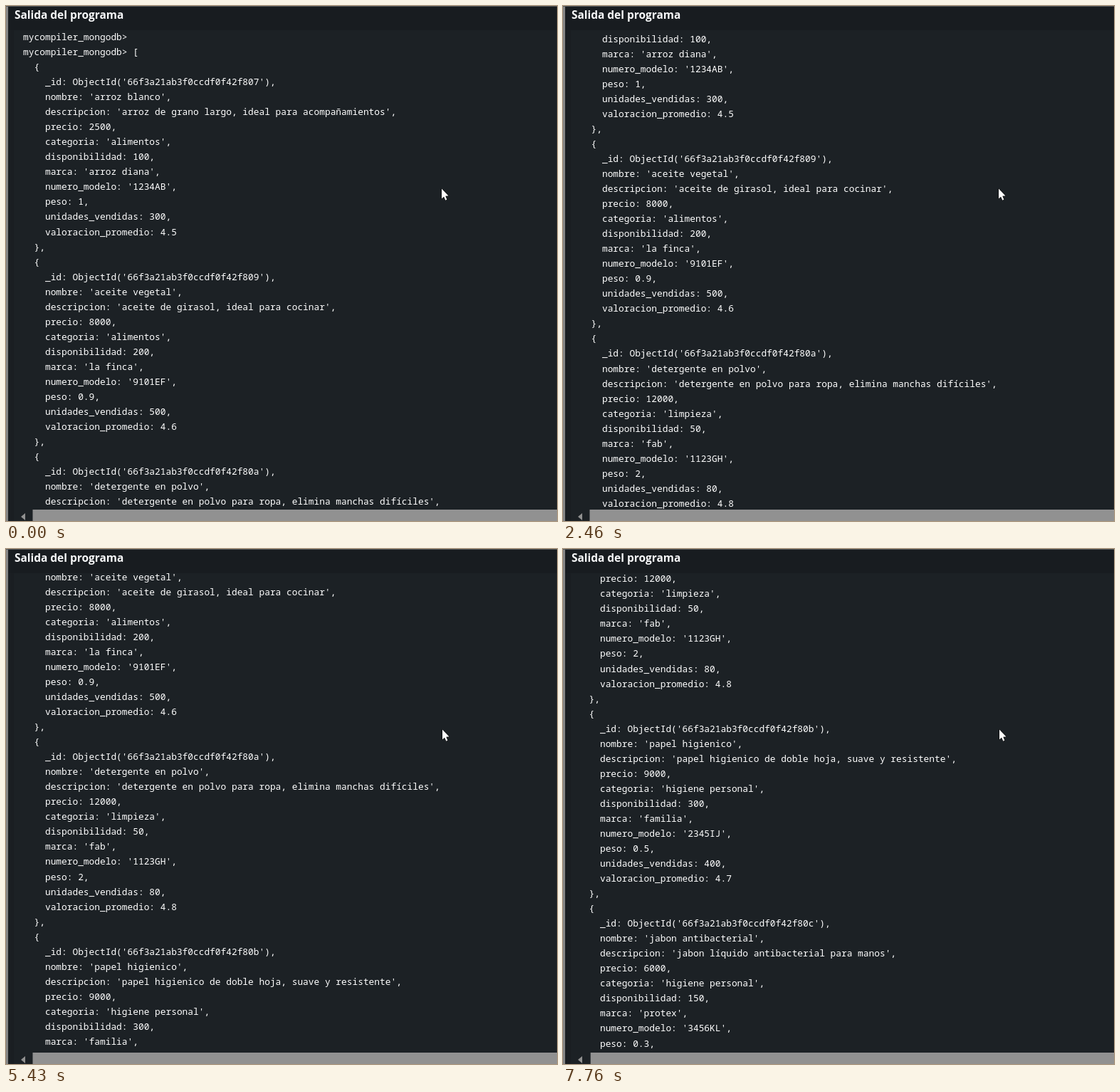
Animation, 774 px wide and 723 px high, one loop 8 s. Source, as an HTML page with a canvas:

```html
<!DOCTYPE html>
<html lang="es">
<head>
<meta charset="utf-8">
<title>Salida del programa</title>
<style>
  html, body { margin: 0; width: 100%; height: 100%; overflow: hidden; background: #1c2125; }
  canvas { display: block; }
</style>
</head>
<body>
<canvas id="stage" width="774" height="723"></canvas>
<script>
const ctx = document.getElementById('stage').getContext('2d');
const LOOP = 8000, LINE = 21.04;

const keys = ['nombre', 'descripcion', 'precio', 'categoria', 'disponibilidad', 'marca',
  'numero_modelo', 'peso', 'unidades_vendidas', 'valoracion_promedio'];

const products = [
  ['807', 'arroz blanco', 'arroz de grano largo, ideal para acompañamientos', 2500, 'alimentos', 100, 'arroz diana', '1234AB', 1, 300, 4.5],
  ['809', 'aceite vegetal', 'aceite de girasol, ideal para cocinar', 8000, 'alimentos', 200, 'la finca', '9101EF', 0.9, 500, 4.6],
  ['80a', 'detergente en polvo', 'detergente en polvo para ropa, elimina manchas difíciles', 12000, 'limpieza', 50, 'fab', '1123GH', 2, 80, 4.8],
  ['80b', 'papel higienico', 'papel higienico de doble hoja, suave y resistente', 9000, 'higiene personal', 300, 'familia', '2345IJ', 0.5, 400, 4.7],
  ['80c', 'jabon antibacterial', 'jabon líquido antibacterial para manos', 6000, 'higiene personal', 150, 'protex', '3456KL', 0.3]
];

const quote = v => typeof v === 'string' ? `'${v}'` : v;

function record([id, ...values]) {
  const fields = values.map((v, i) =>
    `    ${keys[i]}: ${quote(v)}${i < keys.length - 1 ? ',' : ''}`);
  return ['  {', `    _id: ObjectId('66f3a21ab3f0ccdf0f42f${id}'),`, ...fields, '  },'];
}

const lines = ['mycompiler_mongodb>', 'mycompiler_mongodb> [', ...products.flatMap(record)];

const easeOut = power => p => 1 - (1 - p) ** power;
const easeInOut = p => p * p * (3 - 2 * p);

// Each swipe scrolls a distance in a number of discrete steps
const swipes = [
  { start: 670, step: 135, count: 7, distance: 95.3, ease: easeOut(2.3) },
  { start: 2170, step: 143, count: 7, distance: 97.2, ease: easeOut(2.3) },
  { start: 4130, step: 131, count: 12, distance: 183, ease: easeInOut },
  { start: 6220, step: 128, count: 13, distance: 299.5, ease: easeOut(1.54) }
];

function progress({ start, step, count }, t) {
  const done = Math.floor((t - start) / step) + 1;
  return Math.min(Math.max(done / count, 0), 1);
}

const scrollAt = t => swipes.reduce((sum, s) => sum + s.distance * s.ease(progress(s, t)), 0);

// The last swipe drifts right, then left
function shiftAt(t) {
  const p = progress(swipes[3], t);
  return Math.round(p * (12.2 - 15.2 * p));
}

function fill(color, x, y, w, h) {
  ctx.fillStyle = color;
  ctx.fillRect(x, y, w, h);
}

function polygon(points) {
  ctx.beginPath();
  points.forEach(([x, y]) => ctx.lineTo(x, y));
  ctx.closePath();
}

function drawText(scroll, shift) {
  ctx.save();
  ctx.beginPath();
  ctx.rect(4, 34, 770, 672);
  ctx.clip();
  ctx.font = '500 12.85px "Noto Sans Mono", monospace';
  ctx.fillStyle = '#fff';
  lines.forEach((text, i) => {
    const y = Math.round(48 + i * LINE - scroll);
    if (y > 20 && y < 725) ctx.fillText(text, 24.1 + shift, y);
  });
  ctx.restore();
}

function drawScrollbar(shift) {
  fill('#1c2125', 11, 707, 763, 16);
  fill('#919191', 37.5 - shift * 0.4, 707, 740, 16);
  ctx.fillStyle = '#919191';
  polygon([[21, 717], [27, 712], [27, 722]]);
  ctx.fill();
}

function drawPointer(x, y) {
  ctx.save();
  ctx.translate(x, y);
  polygon([[0, 0], [0, 14], [3.1, 11.2], [5.3, 16.2], [7.4, 15.3], [5.3, 10.3], [9.5, 9.9]]);
  ctx.lineWidth = 1;
  ctx.strokeStyle = '#000';
  ctx.stroke();
  ctx.fillStyle = '#fff';
  ctx.fill();
  ctx.restore();
}

function draw(t) {
  const shift = shiftAt(t);
  fill('#1a1e22', 0, 0, 774, 723);
  fill('#1c2125', 11, 34, 763, 689);
  drawText(scrollAt(t), shift);
  fill('#181c20', 3, 0, 771, 34);
  fill('#55585a', 0, 0, 774, 1);
  fill('#858585', 0, 1, 3, 722);
  ctx.font = '700 15.45px "Open Sans", sans-serif';
  ctx.fillStyle = '#f8f9fa';
  ctx.fillText('Salida del programa', 12, 18);
  drawScrollbar(shift);
  if (t < swipes[2].start) drawPointer(612, 256.5);
  else drawPointer(613, 253.5);
}

const start = performance.now();
function tick() {
  draw((performance.now() - start) % LOOP);
  requestAnimationFrame(tick);
}
tick();
</script>
</body>
</html>
```
